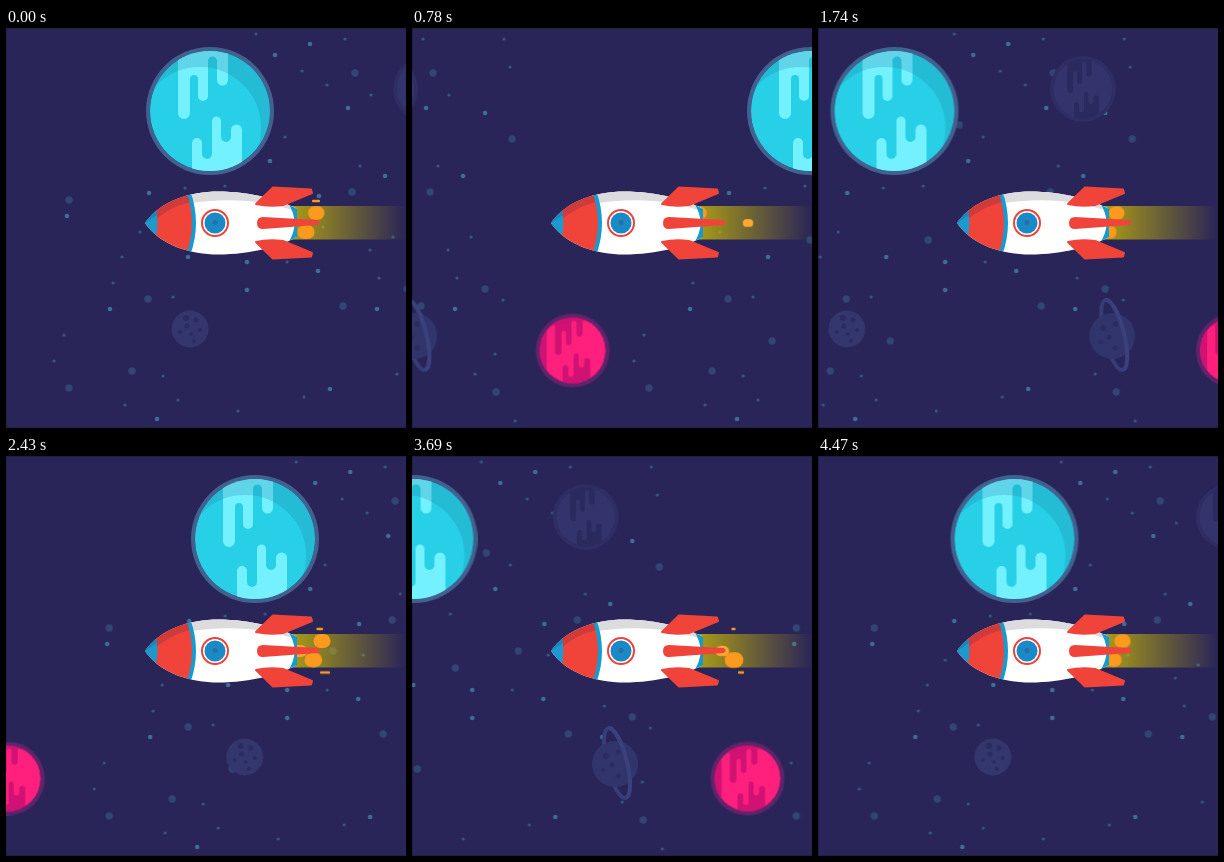
An HTML page for the animation above (4.5 s loop, 400x400 px).

```html
<!DOCTYPE html>
<html lang="en">
<head>
<meta charset="utf-8">
<title>Rocket</title>
<style>
  html, body { margin: 0; width: 100%; height: 100%; overflow: hidden; background: #2a2558; }
  svg { display: block; width: 100vw; height: 100vh; }

  .fly { animation: fly 2250ms steps(75) infinite; }
  @keyframes fly {
    from { transform: translateX(var(--from)); }
    to { transform: translateX(var(--to)); }
  }
  #stars { --from: 0px; --to: 502px; fill: #4b9fc4; }
  .cyan { --from: -66px; --to: 496.5px; animation-delay: -1080ms; }
  .pink { --from: -46px; --to: 550px; }
  .dim { --from: -36px; --to: 648px; animation-delay: -1500ms; }
  .moon { --from: -25.8px; --to: 658.2px; animation-delay: -690ms; }
  .ringed { --from: -52.4px; --to: 631.6px; animation-delay: -1650ms; }

  .puffs > g > * { animation: 300ms infinite; }
  .puffs .top { animation-name: top; animation-delay: -120ms; }
  .puffs .low { animation-name: low; animation-delay: -90ms; }
  .puffs .mid { animation-name: mid; animation-delay: -270ms; }
  .puffs .dash1 { animation-name: dash1; }
  .puffs .dash2 { animation-name: dash2; animation-delay: -270ms; }
  @keyframes top {
    0% { transform: translateX(287px) scale(.9); animation-timing-function: steps(5); }
    50% { transform: translateX(316px) scale(1); animation-timing-function: steps(2); }
    70%, 100% { transform: translateX(330px) scale(0); }
  }
  @keyframes low {
    0% { transform: translateX(286px) scale(.9); animation-timing-function: steps(3); }
    30% { transform: translateX(300px) scale(1); animation-timing-function: steps(3); }
    60% { transform: translateX(322px) scale(1.1); animation-timing-function: steps(3); }
    90%, 100% { transform: translateX(340px) scale(0); }
  }
  @keyframes mid {
    0% { transform: translateX(293px) scale(1); animation-timing-function: steps(5); }
    50% { transform: translateX(336px) scale(.65); animation-timing-function: steps(1); }
    60%, 100% { transform: translateX(340px) scale(0); }
  }
  @keyframes dash1 {
    0% { transform: translateX(310px) scaleX(1); animation-timing-function: steps(6); }
    60%, 100% { transform: translateX(333px) scaleX(0); }
  }
  @keyframes dash2 {
    0% { transform: translateX(319px) scaleX(1); animation-timing-function: steps(5); }
    50%, 100% { transform: translateX(344px) scaleX(0); }
  }
</style>
</head>
<body>
<svg viewBox="0 0 400 400">
  <defs>
    <clipPath id="disc"><circle r="60"/></clipPath>
    <clipPath id="hull">
      <path d="M139 195C155 172 185 163.500 212 163.500C245 163.500 275 172 291 181V209C275 218 245 226.500 212 226.500C185 226.500 155 218 139 195Z"/>
    </clipPath>
    <linearGradient id="glow">
      <stop offset="0" stop-color="#d6c400" stop-opacity=".76"/>
      <stop offset="1" stop-color="#d6c400" stop-opacity="0"/>
    </linearGradient>
    <path id="drips" d="M-32 -62V2a6 6 0 0 0 12 0V-32a4 4 0 0 1 8 0V-15a5 5 0 0 0 10 0V-50a4.500 4.500 0 0 1 9 0V-31a5.500 5.500 0 0 0 11 0V-62Z
      M-18 62V32a5 5 0 0 1 10 0V43a5 5 0 0 0 10 0V10a4.500 4.500 0 0 1 9 0V26a5 5 0 0 0 10 0V19a5.500 5.500 0 0 1 11 0V62Z"/>
  </defs>

  <rect width="400" height="400" fill="#2a2558"/>
  <path d="M400 .5H.5V399.500H400" fill="none" stroke="#000" stroke-opacity=".2"/>

  <g id="stars" class="fly"></g>

  <g transform="translate(0 61)"><g class="fly dim">
    <circle r="33" fill="#2f2d63"/>
    <g transform="scale(.49)" clip-path="url(#disc)">
      <circle r="60" fill="#33346b"/>
      <use href="#drips" fill="#2a2a5f"/>
    </g>
  </g></g>

  <g transform="translate(0 301)"><g class="fly moon">
    <circle r="18.500" fill="#34376d"/>
    <g fill="#2b2b60">
      <circle cx="-4" cy="-11" r="3"/><circle cx="6" cy="-9" r="2.500"/>
      <circle cx="-3" cy="-3" r="2.500"/><circle cx="10" cy="1" r="2"/>
      <circle cx="1" cy="5" r="1.800"/><circle cx="-10" cy="3" r="2"/>
      <circle cx="4" cy="12" r="2"/>
    </g>
  </g></g>

  <g transform="translate(0 308)"><g class="fly ringed">
    <g transform="translate(2 -1) rotate(-14)" fill="none" stroke="#373d78" stroke-width="4">
      <ellipse rx="10" ry="36"/>
    </g>
    <circle r="23" fill="#31356c"/>
    <g fill="#2b2b60">
      <circle cx="-9" cy="-8" r="3"/><circle cx="3" cy="-12" r="2.500"/>
      <circle cx="-3" cy="1" r="2.500"/><circle cx="-12" cy="6" r="2"/><circle cx="3" cy="12" r="2.500"/>
    </g>
    <path transform="translate(2 -1) rotate(-14)" d="M0 -36A10 36 0 0 1 0 36" fill="none" stroke="#3a417d" stroke-width="4"/>
  </g></g>

  <g transform="translate(0 322.500)"><g class="fly pink">
    <circle r="37" fill="#60246a"/>
    <g transform="scale(.55)" clip-path="url(#disc)">
      <circle r="60" fill="#ff1f7d"/>
      <use href="#drips" fill="#cf1273"/>
      <path d="M-62 -62H62V-44Q0 -66 -47 -40V62H-62Z" fill="#cf1273"/>
    </g>
  </g></g>

  <g transform="translate(0 83)"><g class="fly cyan">
    <circle r="64" fill="#41618f"/>
    <g clip-path="url(#disc)">
      <circle r="60" fill="#27d0e6"/>
      <use href="#drips" fill="#73f1ff"/>
      <circle cx="-10" cy="17" r="91" fill="none" stroke="#1c6f95" stroke-opacity=".22" stroke-width="60"/>
    </g>
  </g></g>

  <rect x="284" y="178" width="116" height="33.500" fill="url(#glow)"/>

  <g class="puffs" fill="#fb9a1c">
    <g transform="translate(0 185)"><rect class="top" x="-8.500" y="-7" width="17" height="14" rx="7"/></g>
    <g transform="translate(0 204)"><rect class="low" x="-8.500" y="-7" width="17" height="14" rx="7"/></g>
    <g transform="translate(0 195)"><rect class="mid" x="-8" y="-6" width="16" height="12" rx="6" fill="#fba732"/></g>
    <g transform="translate(0 173)"><rect class="dash1" x="-4" y="-1.300" width="8" height="2.600" rx="1"/></g>
    <g transform="translate(0 216.500)"><rect class="dash2" x="-5" y="-1.300" width="10" height="2.600" rx="1"/></g>
  </g>

  <g clip-path="url(#hull)">
    <rect x="139" y="160" width="152" height="70" fill="#fff"/>
    <path d="M180 160H291V184C262 172 220 169 180 176Z" fill="#dcdcde"/>
    <path d="M139 160H181Q195 195 181 230H139Z" fill="#f0443a"/>
    <path d="M139 160H184V174Q161 180 146 195H139Z" fill="#cf3b3a"/>
    <path d="M139 175H148Q155 195 148 215H139Z" fill="#1c9ad0"/>
    <path d="M139 175H148L151 187L139 195Z" fill="#1886ba"/>
    <path d="M181 160Q195 195 181 230" fill="none" stroke="#159bd0" stroke-width="4"/>
    <path d="M282 175Q295 195 282 215H300V175Z" fill="#159bd0"/>
    <path d="M288 175Q297 195 288 215H300V175Z" fill="#0f86bd"/>
  </g>

  <circle cx="209" cy="195" r="13" fill="#fff" stroke="#ec4339" stroke-width="2"/>
  <circle cx="209" cy="195" r="10.500" fill="#1a8ac6"/>
  <circle cx="209" cy="194.500" r="2.500" fill="#2a6d9e"/>

  <g fill="#f0443a" stroke="#f0443a" stroke-width="2" stroke-linejoin="round">
    <path id="fin" d="M250 176L267 159.500L305 161.500L306 165L277 177Q263 179 250 176Z"/>
    <use href="#fin" transform="matrix(1 0 0 -1 0 390)"/>
    <path d="M257 190Q252 190 252 195T257 200L311 196Q314 194.500 311 193Z"/>
  </g>
</svg>
<script>
  const big = [349,45, 63,172, 346,164, 142,271, 126,343, 63,360, 337,278, 255,97, 428,111,
    224,212, 287,195, 186,313, 401,261, 412,364];
  const mid = [269,27, 304,16, 342,80, 401,85, 264,133, 379,148, 143,165, 313,168, 61,188, 104,281,
    371,281, 241,234, 241,262, 151,391, 324,361, 312,243, 182,229];
  const small = [250,6, 339,11, 296,43, 321,57, 365,67, 426,39, 420,11, 279,109, 354,138, 219,158,
    179,160, 387,209, 364,222, 317,199, 116,229, 134,204, 281,234, 107,255, 373,250, 167,269, 58,307,
    48,333, 157,348, 172,372, 119,377, 232,383, 298,369, 411,326, 391,346, 431,393, 419,272];
  const stars = document.getElementById('stars');
  const SPAN = 502;

  function dot(x, y, r, opacity) {
    const c = document.createElementNS('http://www.w3.org/2000/svg', 'circle');
    const attrs = { cx: x, cy: y, r, 'fill-opacity': opacity };
    for (const k in attrs) c.setAttribute(k, attrs[k]);
    stars.append(c);
  }

  function scatter(points, r, opacity) {
    for (let i = 0; i < points.length; i += 2) {
      dot(points[i], points[i + 1], r, opacity);
      dot(points[i] - SPAN, points[i + 1], r, opacity);
    }
  }

  scatter(big, 3.7, 0.27);
  scatter(mid, 2.3, 0.6);
  scatter(small, 1.6, 0.42);
</script>
</body>
</html>
```
